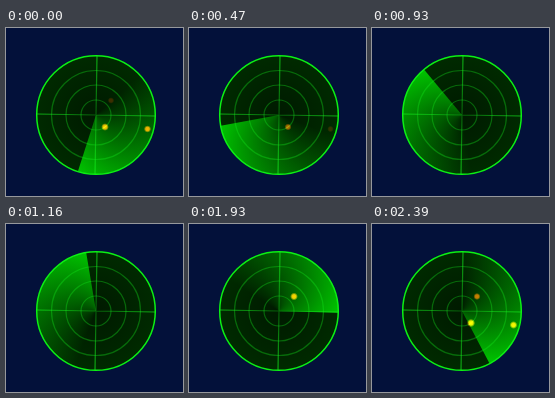
An HTML page with a canvas for the animation above (2470 ms loop, 177x168 px).

```html
<!DOCTYPE html>
<html>
<head>
<meta charset="utf-8">
<style>
  html, body { margin: 0; height: 100%; overflow: hidden; background: #03113a; }
  canvas { display: block; }
</style>
</head>
<body>
<canvas width="177" height="168"></canvas>
<script>
const ctx = document.querySelector('canvas').getContext('2d');
const LOOP = 2470, STEPS = 32, FPS = 13;
const CX = 90, CY = 87, R = 59.3;
const START = 107.8, DEG_PER_MS = 0.1316, TRAIL = 150, BLIP_LIFE = 172;
const blips = [[99, 99], [141.5, 101], [105, 72.5]];
const rad = deg => deg * Math.PI / 180;

function circle(x, y, r) {
  ctx.beginPath();
  ctx.arc(x, y, r, 0, 2 * Math.PI);
}

function radial(x, y, r, ...stops) {
  const gradient = ctx.createRadialGradient(x, y, 0, x, y, r);
  stops.forEach((color, i) => gradient.addColorStop(i / (stops.length - 1), color));
  return gradient;
}

function fillDial(style) {
  ctx.fillStyle = style;
  circle(CX, CY, R);
  ctx.fill();
}

function drawTrail(angle) {
  const sweep = ctx.createConicGradient(rad(angle - TRAIL), CX, CY);
  const end = TRAIL / 360;
  sweep.addColorStop(0, 'rgba(0,205,0,0)');
  sweep.addColorStop(end, 'rgba(0,205,0,.95)');
  sweep.addColorStop(end + 0.02, 'rgba(0,205,0,.95)');
  sweep.addColorStop(end + 0.02, 'rgba(0,205,0,0)');
  ctx.fillStyle = sweep;
  ctx.beginPath();
  ctx.moveTo(CX, CY);
  ctx.arc(CX, CY, R, rad(angle - TRAIL), rad(angle));
  ctx.fill();
}

function drawGrid() {
  ctx.lineWidth = 1.2;
  ctx.strokeStyle = 'rgba(20,230,30,.36)';
  for (const r of [15, 30, 44.5]) {
    circle(CX, CY, r);
    ctx.stroke();
  }
  ctx.strokeStyle = radial(CX, CY, R, 'rgba(20,240,30,.3)', 'rgba(20,240,30,.65)');
  ctx.beginPath();
  ctx.moveTo(CX - R, CY - 1);
  ctx.lineTo(CX + R, CY + 1);
  ctx.moveTo(CX + 1, CY - R);
  ctx.lineTo(CX - 1, CY + R);
  ctx.stroke();
  ctx.lineWidth = 1.5;
  ctx.strokeStyle = '#0cf014';
  circle(CX, CY, R);
  ctx.stroke();
}

// Blips add their light to the green beneath, so they look yellower inside the trail.
function drawBlip(x, y, angle) {
  const bearing = Math.atan2(y - CY, x - CX) * 180 / Math.PI;
  const age = (angle - bearing + 720) % 360;
  if (age > BLIP_LIFE) return;
  const hue = 32 - age * 0.12;
  const r = 4.2 - age * 0.006;
  const color = `hsl(${hue} 100% 50%`;
  ctx.globalCompositeOperation = 'lighter';
  ctx.globalAlpha = Math.min(1, (BLIP_LIFE - age) / 80);
  ctx.fillStyle = radial(x, y, r, color + ')', color + ' / .9)', color + ' / 0)');
  circle(x, y, r);
  ctx.fill();
  ctx.globalAlpha = 1;
  ctx.globalCompositeOperation = 'source-over';
}

function draw(time) {
  const step = Math.min(STEPS - 1, Math.floor(time % LOOP * FPS / 1000));
  const stepTime = Math.ceil(step * 100 / FPS) * 10;
  const angle = START + stepTime * DEG_PER_MS;
  ctx.clearRect(0, 0, 177, 168);
  fillDial('#002a00');
  drawTrail(angle);
  fillDial(radial(CX, CY, R, 'rgba(0,10,0,.5)', 'rgba(0,10,0,0)'));
  drawGrid();
  for (const [x, y] of blips) drawBlip(x, y, angle);
}

const start = performance.now();
function tick() {
  draw(performance.now() - start);
  requestAnimationFrame(tick);
}
tick();
</script>
</body>
</html>
```
